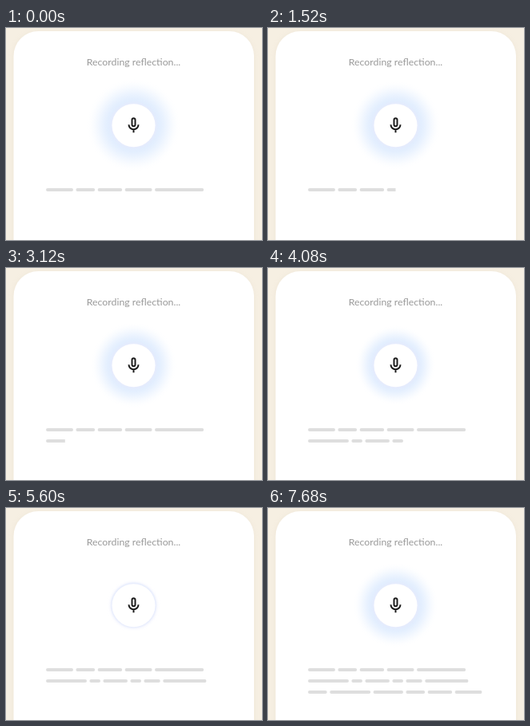
An HTML page for the animation above (8000 ms loop, 320 by 266 pixels).

```html
<!DOCTYPE html>
<html lang="en">
<head>
<meta charset="utf-8">
<title>Recording</title>
<style>
html, body { margin: 0; width: 100%; height: 100%; overflow: hidden; background: #f6efe2; }
svg { display: block; width: 100vw; height: 100vh; }
text { font: 12.3px Lato, "Open Sans", sans-serif; fill: #999; text-anchor: middle; }
</style>
</head>
<body>
<svg id="stage" viewBox="0 0 320 266">
  <defs>
    <filter id="soft" x="-20%" y="-20%" width="140%" height="140%"><feGaussianBlur stdDeviation="2"/></filter>
    <filter id="cardShadow"><feGaussianBlur stdDeviation="3"/></filter>
    <radialGradient id="halo" gradientUnits="userSpaceOnUse" cx="159.5" cy="122" fr="26" r="50"/>
  </defs>
  <rect width="320" height="266" fill="#f6efe2"/>
  <rect x="9" y="5" width="301" height="320" rx="31" fill="#d9cdb8" opacity=".25" filter="url(#cardShadow)"/>
  <rect x="9.5" y="4" width="300.5" height="320" rx="31" fill="#fff"/>
  <text x="159.5" y="46.7">Recording reflection...</text>
  <circle id="glow" cx="159.5" cy="122" r="50" fill="url(#halo)"/>
  <circle cx="159.5" cy="122.3" r="28.3" fill="#e9ebfc" filter="url(#soft)"/>
  <circle cx="159.5" cy="122.2" r="27" fill="#fff"/>
  <g transform="translate(147.5 110.3)" fill="none" stroke="#1c1c1c" stroke-width="2">
    <rect x="10" y="3" width="4" height="10" rx="2"/>
    <path d="M6 11a6 6 0 0 0 12 0M12 17v4"/>
  </g>
</svg>
<script>
const LOOP = 8000, STEP = 80;
const LEFT = 50, TOP = 201, LINE_HEIGHT = 14, CHAR = 3.4;
const stage = document.getElementById('stage');
const glow = document.getElementById('glow');
const halo = document.getElementById('halo');

// Word lengths in characters; each line is typed at two speeds that meet at mid = [time, characters].
const lines = [
  { words: [10, 7, 9, 10, 18], start: 280, mid: [1440, 29], end: 2160 },
  { words: [15, 4, 9, 4, 6, 16], start: 2880, mid: [4080, 35], end: 4880 },
  { words: [7, 15, 11, 7, 9, 10], start: 5680, mid: [6640, 37.4], end: 7680 }
];

const glowKeys = [[0, 58], [800, 54], [2160, 57], [4080, 50], [5600, 30], [6640, 63], [7680, 53]];

const linear = k => k;
const smooth = k => k * k * (3 - 2 * k);

function add(parent, tag, attrs) {
  const node = document.createElementNS('http://www.w3.org/2000/svg', tag);
  for (const name in attrs) node.setAttribute(name, attrs[name]);
  return parent.appendChild(node);
}

function valueAt(keys, t, ease) {
  if (t <= keys[0][0]) return keys[0][1];
  for (let i = 1; i < keys.length; i++) {
    const [t0, a] = keys[i - 1], [t1, b] = keys[i];
    if (t <= t1) return a + (b - a) * ease((t - t0) / (t1 - t0));
  }
  return keys[keys.length - 1][1];
}

for (let k = 0; k <= 1; k += 0.125)
  add(halo, 'stop', { offset: k, 'stop-color': '#dfecfe', 'stop-opacity': 1 - smooth(k) });

lines.forEach((line, i) => {
  const y = TOP + i * LINE_HEIGHT;
  const clip = add(stage, 'clipPath', { id: 'reveal' + i });
  line.mask = add(clip, 'rect', { x: LEFT, y, width: 0, height: 4 });
  const group = add(stage, 'g', { fill: '#dedede', 'clip-path': `url(#reveal${i})` });
  let column = 0;
  for (const length of line.words) {
    add(group, 'rect', { x: LEFT + column * CHAR, y, width: length * CHAR, height: 4, rx: 2 });
    column += length + 1;
  }
  line.length = column - 1;
  line.keys = [[line.start, 0], line.mid, [line.end, line.length]];
});

function draw(time) {
  const t = Math.floor(time % LOOP / STEP) * STEP;
  for (const line of lines) {
    // The first line is still complete until it is typed again.
    const leftover = line === lines[0] && t < line.start;
    const typed = leftover ? line.length : valueAt(line.keys, t, linear);
    line.mask.setAttribute('width', typed * CHAR);
  }
  const r = valueAt(glowKeys, t, smooth);
  glow.setAttribute('r', r);
  halo.setAttribute('r', r);
}

const start = performance.now();
function tick() {
  draw(performance.now() - start);
  requestAnimationFrame(tick);
}
tick();
</script>
</body>
</html>
```
